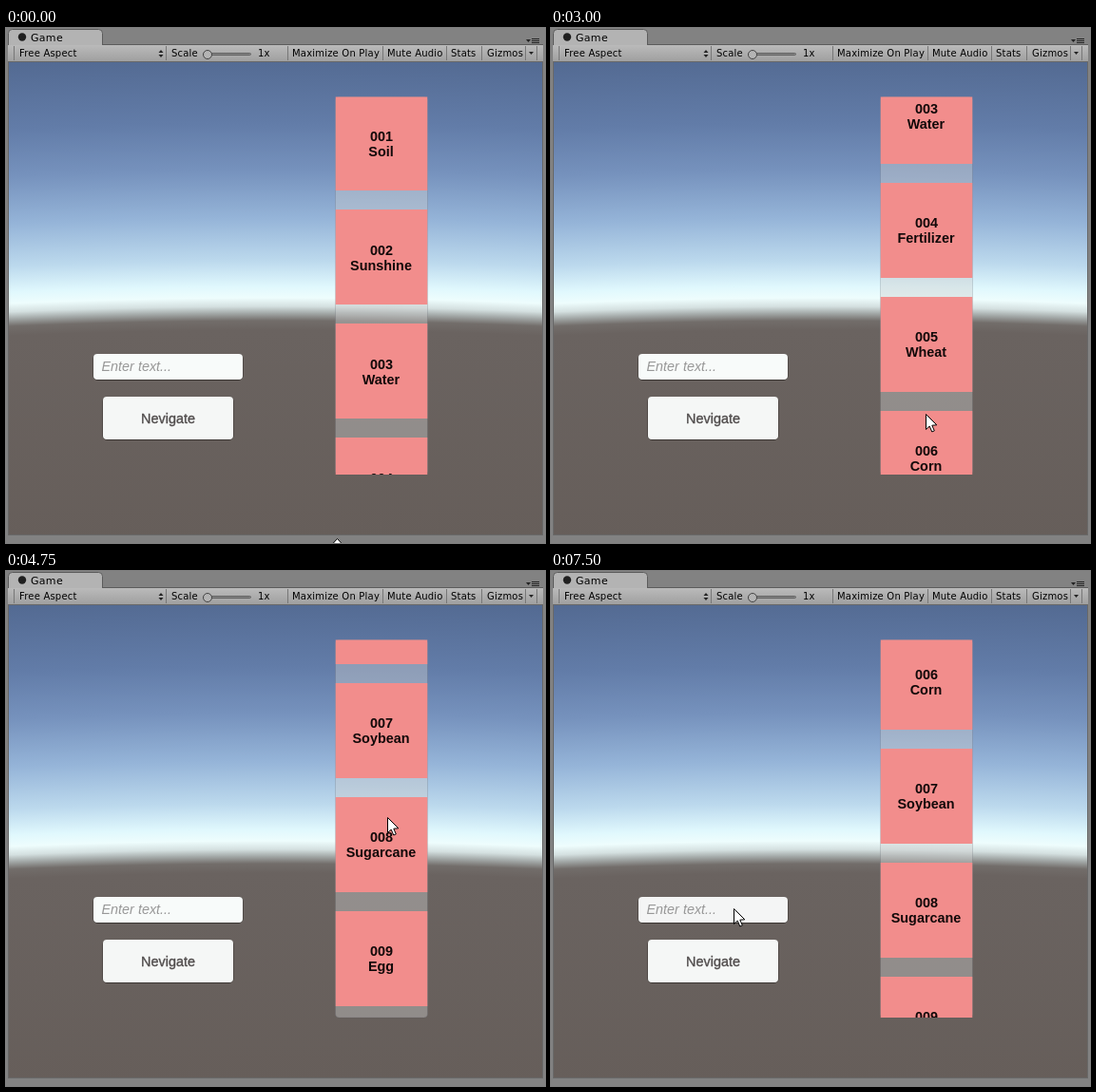
Recreate the animation shown at these times as an HTML page with a canvas. Size 567 px wide and 542 px high, loop 8 s.

```html
<!DOCTYPE html>
<html lang="en">
<head>
<meta charset="utf-8">
<title>Scroll list</title>
<style>
  html, body { margin: 0; width: 100%; height: 100%; overflow: hidden; background: #828282; }
  canvas { display: block; }
</style>
</head>
<body>
<canvas id="stage" width="567" height="542"></canvas>
<script>
const W = 567, H = 542, LOOP = 8000, STEP = 250;
const ctx = document.getElementById('stage').getContext('2d');
const UI = '"DejaVu Sans", sans-serif';
const ARIAL = '14.4px "Liberation Sans", Arial, sans-serif';
const ITEMS = ['Soil', 'Sunshine', 'Water', 'Fertilizer', 'Wheat', 'Corn', 'Soybean', 'Sugarcane', 'Egg', 'Milk'];
const VIEW = { x: 346.5, y: 72.5, w: 97, h: 397.5 };
const PITCH = 120, CARD = 100, FIRST = 71;

// Each drag or release ends in one pose: time, list offset, pointer x and y.
const POSES = [
  [0, 0, 348, 537], [500, 0, 404, 432], [1000, 0, 404, 432], [1250, 51, 401, 304],
  [2250, 364.4, 404, 189], [3250, 262, 393, 420], [3750, 345.4, 393, 404],
  [4750, 673.4, 401, 259], [5750, 615, 193, 355], [7000, 604.4, 192, 355]
].map(([time, scroll, x, y]) => ({ time, scroll, x, y }));

const easeOut = k => 1 - (1 - k) ** 2;

function poseAt(t) {
  const i = POSES.findLastIndex(p => p.time <= t);
  const a = POSES[i], b = POSES[i + 1];
  if (!b) return a;
  const k = easeOut((t - a.time) / (b.time - a.time));
  const mix = key => a[key] + (b[key] - a[key]) * k;
  return { scroll: mix('scroll'), x: mix('x'), y: mix('y') };
}

function box(c, x, y, w, h, fill) {
  c.fillStyle = fill;
  c.fillRect(x, y, w, h);
}

function paint(c, fill, stroke) {
  if (fill) { c.fillStyle = fill; c.fill(); }
  if (stroke) { c.strokeStyle = stroke; c.lineWidth = 1; c.stroke(); }
}

function round(c, x, y, w, h, r, fill, stroke) {
  c.beginPath();
  c.roundRect(x, y, w, h, r);
  paint(c, fill, stroke);
}

function disc(c, x, y, r, fill, stroke) {
  c.beginPath();
  c.arc(x, y, r, 0, 7);
  paint(c, fill, stroke);
}

function poly(c, pts, fill, stroke) {
  c.beginPath();
  pts.forEach(([x, y]) => c.lineTo(x, y));
  c.closePath();
  paint(c, fill, stroke);
}

// Small triangle; a negative height points up.
function caretMark(c, x, y, h) {
  poly(c, [[x - 2.5, y], [x + 2.5, y], [x, y + h]], '#222');
}

function text(c, str, x, y, font, fill, align = 'left', spacing = 0) {
  c.font = font;
  c.fillStyle = fill;
  c.textAlign = align;
  c.letterSpacing = spacing + 'px';
  c.fillText(str, x, y);
}

function vertical(c, y0, y1, stops) {
  const g = c.createLinearGradient(0, y0, 0, y1);
  stops.forEach(([y, color]) => g.addColorStop((y - y0) / (y1 - y0), color));
  return g;
}

function drawSky(c) {
  const sky = vertical(c, 30, 540, [
    [30, '#536a92'], [100, '#627ca8'], [150, '#7692bd'], [200, '#95b4d8'], [245, '#bcd9ed'], [272, '#e0f8fd'],
    [284, '#eefdfd'], [293, '#d4e0e0'], [300, '#a4aaa9'], [308, '#726d6a'], [318, '#6a6360'], [540, '#665e5a']
  ]);
  c.save();
  c.beginPath();
  c.rect(3, 36, 561, 497);
  c.clip();
  // The horizon bends down towards both sides.
  for (let x = 3; x < 564; x++) {
    c.setTransform(1, 0, 0, 1, 0, 6 * ((x - 283) / 283) ** 2);
    box(c, x, 28, 1, 512, sky);
  }
  c.restore();
}

function drawToolbar(c) {
  round(c, 2.5, 1.5, 99, 24, [4, 4, 0, 0], '#b3b3b3', '#5c5c5c');
  box(c, 2, 18, 563, 17, vertical(c, 18, 35, [[18, '#bababa'], [35, '#a0a0a0']]));
  box(c, 102, 17, 463, 1, '#5c5c5c');
  disc(c, 17, 9.5, 4.2, '#202020');
  text(c, 'Game', 26, 14, '11px ' + UI, '#000', 'left', 0.3);
  [8, 168, 296, 396, 463, 500, 546, 558].forEach(x => box(c, x, 19, 1, 15, '#777'));
  const labels = { 'Free Aspect': 14, 'Scale': 174, '1x': 265, 'Maximize On Play': 301, 'Mute Audio': 401, 'Stats': 468, 'Gizmos': 506 };
  for (const name in labels) text(c, name, labels[name], 30, '10px ' + UI, '#000', 'left', 0.2);
  caretMark(c, 163, 26, -3);
  caretMark(c, 163, 28, 3);
  caretMark(c, 552.5, 25, 3);
  caretMark(c, 549.5, 12, 3);
  for (let y = 11; y < 16; y += 2) box(c, 553, y, 8, 1, '#222');
  round(c, 207.5, 26.5, 50, 2, 1, '#888', '#606060');
  disc(c, 212, 28, 4.5, '#b4b4b4', '#444');
}

const back = document.createElement('canvas');
back.width = W;
back.height = H;
(function drawBack(c) {
  box(c, 0, 0, W, H, '#828282');
  drawSky(c);
  drawToolbar(c);
  c.strokeStyle = '#686868';
  c.strokeRect(2.5, 35.5, 562, 498);
})(back.getContext('2d'));

function drawList(scroll) {
  const { x, y, w, h } = VIEW;
  round(ctx, x, y, w, h, 4, 'rgba(205,205,205,0.41)', 'rgba(80,85,95,0.2)');
  ctx.save();
  ctx.beginPath();
  ctx.rect(x, y, w, h);
  ctx.clip();
  ITEMS.forEach((name, i) => {
    const top = FIRST + PITCH * i - scroll, line = Math.floor(top) + 48;
    box(ctx, x, Math.round(top), w, CARD, '#f28d8c');
    text(ctx, String(i + 1).padStart(3, '0'), 395, line, 'bold ' + ARIAL, '#120909', 'center');
    text(ctx, name, 394.5, line + 16, 'bold ' + ARIAL, '#120909', 'center');
  });
  ctx.restore();
}

function panel(x, y, w, h, fill) {
  round(ctx, x - 0.5, y, w + 1, h + 1, 5, 'rgba(40,36,34,0.7)');
  round(ctx, x, y, w, h, 4, fill);
}

function drawForm(t) {
  const pressed = t >= 5500 && t < 6000, focus = t - 5750;
  panel(92, 343, 157, 27, pressed ? '#e6e6e6' : focus >= 0 ? '#f4f5f5' : '#f8fbfa');
  text(ctx, 'Enter text...', 100.5, 361, 'italic ' + ARIAL, '#989898');
  if (focus >= 0 && focus % 1100 < 550) box(ctx, 100, 348, 1, 16, '#333');
  panel(102, 388, 137, 45, '#f5f7f6');
  text(ctx, 'Nevigate', 170.5, 416, ARIAL, '#504c4c', 'center');
  ctx.strokeStyle = '#504c4c';
  ctx.lineWidth = 0.35;
  ctx.strokeText('Nevigate', 170.5, 416);
}

function drawPointer(t, x, y) {
  // Over the window edge the pointer is a resize arrow.
  const shape = t < STEP
    ? [[0, 0], [5, 5.5], [-5, 5.5]]
    : [[0, 0], [0, 16], [3.7, 12.6], [6.3, 18.5], [8.8, 17.4], [6.3, 11.7], [11.3, 11.3]];
  const px = Math.round(x) + 0.5, py = Math.round(y) + 0.5;
  poly(ctx, shape.map(([dx, dy]) => [px + dx, py + dy]), '#fff', '#000');
}

const start = performance.now();

function frame(now) {
  const t = Math.floor(Math.max(0, now - start) % LOOP / STEP) * STEP;
  const pose = poseAt(t);
  ctx.drawImage(back, 0, 0);
  drawList(pose.scroll);
  drawForm(t);
  drawPointer(t, pose.x, pose.y);
  requestAnimationFrame(frame);
}
requestAnimationFrame(frame);
</script>
</body>
</html>
```
